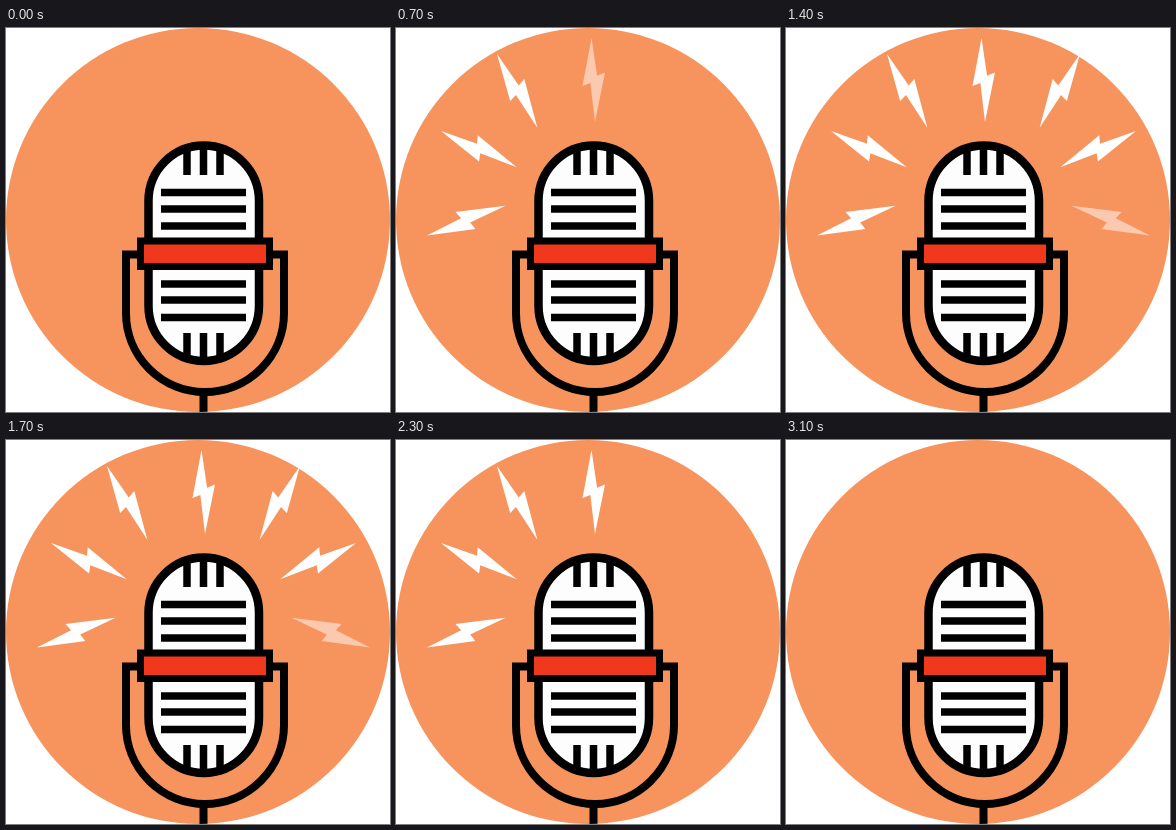
An HTML page with a canvas for the animation above (3200 ms loop, 384x384 px).

```html
<!DOCTYPE html>
<html lang="en">
<head>
<meta charset="utf-8">
<title>Microphone</title>
<style>
html, body { margin: 0; width: 100%; height: 100%; overflow: hidden; background: #fff; }
canvas { display: block; width: 384px; height: 384px; }
</style>
</head>
<body>
<canvas id="stage" width="384" height="384"></canvas>
<script>
const ctx = document.getElementById('stage').getContext('2d');
const LOOP = 3200, STEP = 100, AXIS = 197.5;
const ORANGE = '#f7945e', RED = '#f0391c', BLACK = '#000', WHITE = '#fff';

// Bolt outline: distance along its axis, offset to the side
const BOLT = [[0, 0], [38, 4], [35, 12], [84, 0], [45, -3], [47.5, -11]];
// Outer tip and inner tip of the bolts on the left and the top
const TIPS = [
  [31, 207.5, 109, 178],
  [45, 103, 121, 139.5],
  [101, 26, 141.5, 100],
  [195.5, 10, 199, 94]
];

function drawBolt(tips, mirror, alpha) {
  const [x0, y0, x1, y1] = tips;
  const len = Math.hypot(x1 - x0, y1 - y0);
  const dx = (x1 - x0) / len, dy = (y1 - y0) / len;
  ctx.globalAlpha = alpha;
  ctx.fillStyle = WHITE;
  ctx.beginPath();
  for (const [u, v] of BOLT) {
    const x = x0 + dx * u + dy * v;
    const y = y0 + dy * u - dx * v;
    ctx.lineTo(mirror ? 2 * AXIS - x : x, y);
  }
  ctx.fill();
  ctx.globalAlpha = 1;
}

function line(x0, y0, x1, y1, width) {
  ctx.lineWidth = width;
  ctx.beginPath();
  ctx.moveTo(x0, y0);
  ctx.lineTo(x1, y1);
  ctx.stroke();
}

function drawMic() {
  ctx.strokeStyle = BLACK;

  // Yoke and stem
  ctx.lineWidth = 8;
  ctx.beginPath();
  ctx.moveTo(134, 226.5);
  ctx.lineTo(120, 226.5);
  ctx.lineTo(120, 285);
  ctx.arc(199, 285, 79, Math.PI, 0, true);
  ctx.lineTo(278, 226.5);
  ctx.lineTo(264, 226.5);
  ctx.stroke();
  line(197.5, 364, 197.5, 384, 8);

  // Capsule with its grille
  ctx.beginPath();
  ctx.roundRect(142.5, 117.5, 110.5, 215.5, 55.25);
  ctx.fillStyle = '#fdfdfe';
  ctx.fill();
  for (const x of [181, 197.5, 214]) {
    line(x, 119, x, 147, 7.5);
    line(x, 305, x, 332, 7.5);
  }
  for (const y of [164.5, 181, 198, 256, 272, 289.5]) line(155, y, 240, y, 7.5);
  ctx.lineWidth = 8.5;
  ctx.beginPath();
  ctx.roundRect(142.5, 117.5, 110.5, 215.5, 55.25);
  ctx.stroke();

  // Band
  ctx.fillStyle = RED;
  ctx.lineWidth = 7;
  ctx.beginPath();
  ctx.rect(134.5, 213, 129, 25.5);
  ctx.fill();
  ctx.stroke();
}

// Each bolt appears in two steps and leaves in two, last one first
function boltAlpha(i, step) {
  const on = i < 6 ? 1 + 2 * i : 14;
  const off = i < 6 ? 30 - 2 * i : 17;
  if (step < on || step > off) return 0;
  return step === on || step === off ? 0.5 : 1;
}

function draw(now) {
  const step = Math.floor((now % LOOP) / STEP);
  ctx.fillStyle = WHITE;
  ctx.fillRect(0, 0, 384, 384);
  ctx.fillStyle = ORANGE;
  ctx.beginPath();
  ctx.arc(192, 192, 192, 0, 2 * Math.PI);
  ctx.fill();
  ctx.save();
  ctx.clip();
  drawMic();
  ctx.restore();
  for (let i = 0; i < 7; i++) {
    const alpha = boltAlpha(i, step);
    if (alpha) drawBolt(TIPS[i < 4 ? i : 6 - i], i > 3, alpha);
  }
}

const start = performance.now();
function tick() {
  draw(performance.now() - start);
  requestAnimationFrame(tick);
}
tick();
</script>
</body>
</html>
```
